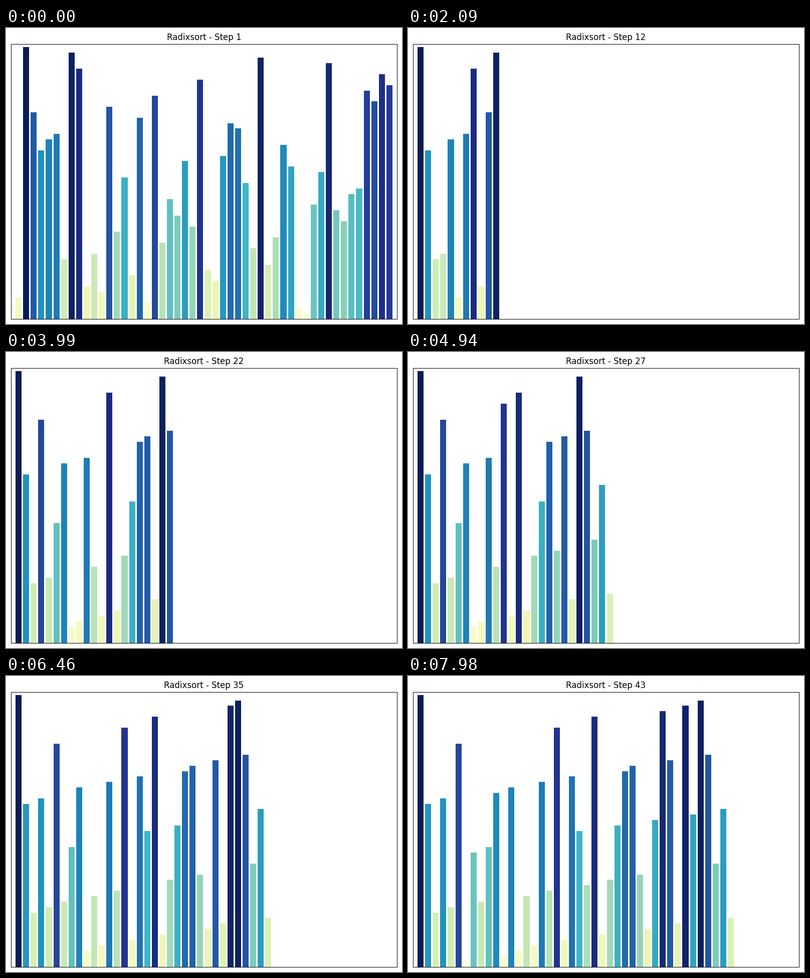
A matplotlib script for the animation above (8 s loop, 790 by 590 pixels).

```python
import matplotlib.pyplot as plt
from matplotlib.animation import FuncAnimation

WIDTH, HEIGHT, DPI = 790, 590, 100
LOOP_MS, TICK_MS, STEP_MS = 8000, 20, 190

# The shuffled numbers 1 to 50 to be sorted; all else follows from them.
VALUES = [
    4, 50, 38, 31, 33, 34, 11, 49, 46, 6, 12, 5, 39, 16, 26, 8, 37,
    3, 41, 14, 22, 19, 29, 17, 44, 9, 7, 30, 36, 35, 25, 13, 48, 10,
    15, 32, 28, 2, 1, 21, 27, 47, 20, 18, 23, 24, 42, 40, 45, 43,
]
COUNT = len(VALUES)
CMAP = plt.get_cmap("YlGnBu")

plt.rcParams["font.family"] = "DejaVu Sans"
plt.rcParams["axes.linewidth"] = 72 / DPI  # one pixel

fig = plt.figure(figsize=(WIDTH / DPI, HEIGHT / DPI), dpi=DPI, facecolor="white")
ax = fig.add_axes([10 / WIDTH, 10 / HEIGHT, 770 / WIDTH, 547.67 / HEIGHT])
ax.set(xticks=[], yticks=[])
bars = ax.bar(range(COUNT), VALUES, width=0.8)
ax.set(xlim=(-1, COUNT), ylim=(0, 1.01 * COUNT))
title = ax.set_title("", fontsize=12, pad=6)


def contents(step):
    """The full list first, then the joined digit buckets as they fill."""
    if step == 0:
        return VALUES
    # A stable sort by the ones digit equals joining the ten buckets.
    return sorted(VALUES[:step], key=lambda v: v % 10)


def draw(frame):
    step = int((frame + 0.5) * TICK_MS // STEP_MS)
    shown = contents(step)
    for bar in bars:
        bar.set_visible(False)
    for bar, value in zip(bars, shown):
        bar.set_visible(True)
        bar.set_height(value)
        bar.set_facecolor(CMAP(value / COUNT))
    title.set_text(f"Radixsort - Step {step + 1}")
    return [*bars, title]


anim = FuncAnimation(fig, draw, frames=LOOP_MS // TICK_MS, interval=TICK_MS,
                     init_func=lambda: draw(0), repeat=True, repeat_delay=0)
plt.show()
```
